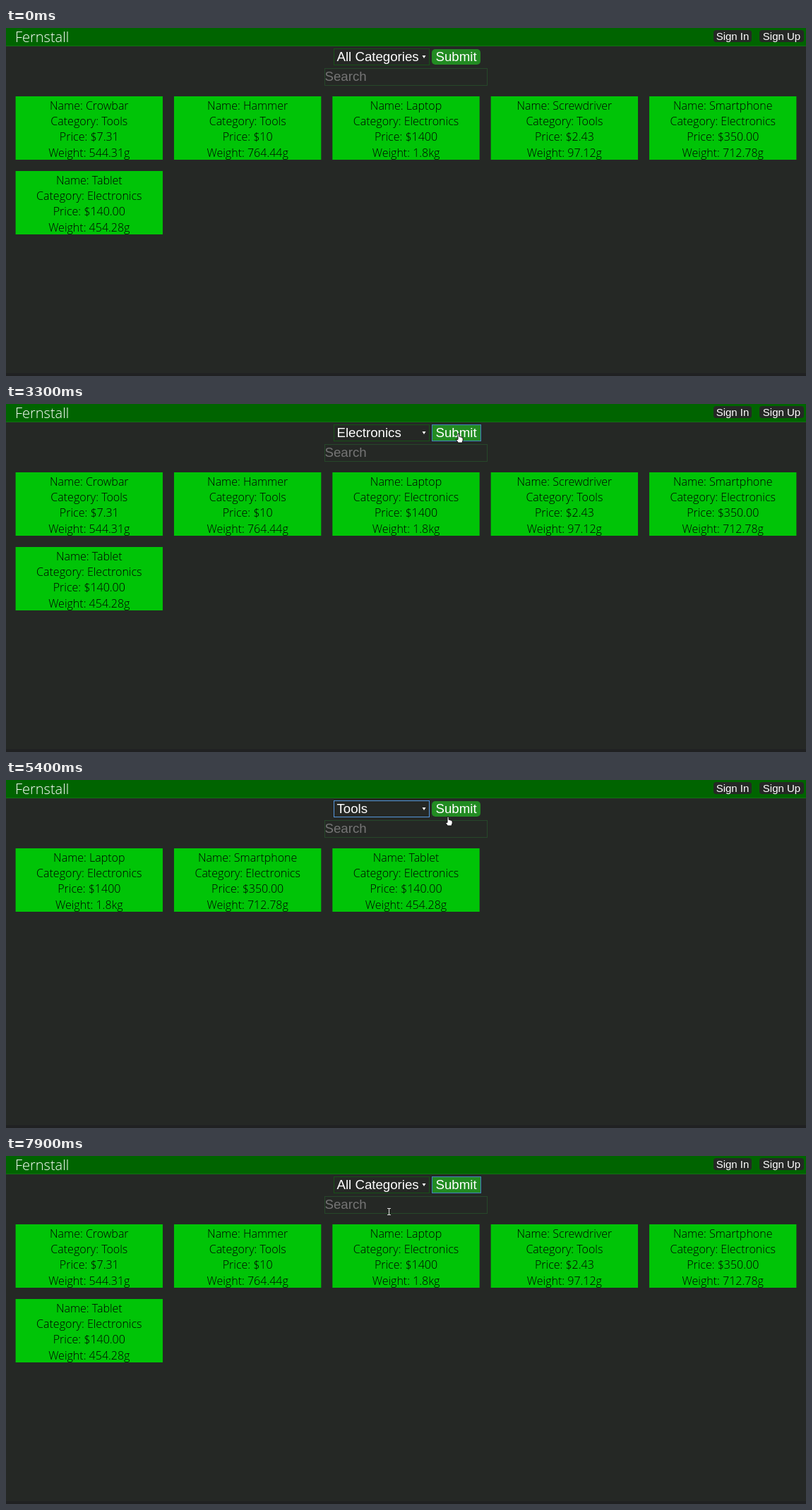
An HTML page with a canvas that plays this animation: 1133x494 px, repeating every 8 s.

```html
<!DOCTYPE html>
<html lang="en">
<head>
<meta charset="utf-8">
<title>Store</title>
<style>
html, body { margin: 0; width: 100%; height: 100%; overflow: hidden; background: #252825; }
canvas { display: block; }
</style>
</head>
<body>
<canvas id="stage" width="1133" height="494"></canvas>
<script>
const ctx = document.getElementById('stage').getContext('2d');
const LOOP = 8000, STEP = 100;
const BG = '#252825', GREEN = '#00c407', BLUE = '#5596dc';
const LIGHT = '"Open Sans", "Noto Sans", sans-serif';
const ARIAL = '"Liberation Sans", Arial, sans-serif';
const OPTIONS = ['All Categories', 'Electronics', 'Tools'];
const MENU_TOP = 53, ROW = 23.5;

const PRODUCTS = [
  ['Crowbar', 'Tools', '$7.31', '544.31g'],
  ['Hammer', 'Tools', '$10', '764.44g'],
  ['Laptop', 'Electronics', '$1400', '1.8kg'],
  ['Screwdriver', 'Tools', '$2.43', '97.12g'],
  ['Smartphone', 'Electronics', '$350.00', '712.78g'],
  ['Tablet', 'Electronics', '$140.00', '454.28g']
];

// Each round opens the menu, picks an option, then submits it.
const ROUNDS = [
  { option: 1, open: 1600, pick: 2600, submit: 3300, y: 42 },
  { option: 2, open: 4400, pick: 5100, submit: 5700, y: 52 },
  { option: 0, open: 6300, pick: 6900, submit: 7400, y: 43 }
];
const LOAD = 200;

const onSubmit = t => ({ t, x: 641, y: 42 });
const onOption = (t, i) => ({ t, x: 545, y: 60 + 22.5 * i });

const PATH = [
  { t: 300, x: 145, y: 84 },
  { t: 500, x: 459, y: 44 },
  { t: 1000, x: 648, y: 50 },
  ...ROUNDS.flatMap(({ option, open, pick, submit, y }) => [
    { t: open, x: 549, y },
    onOption(pick - STEP, option),
    onOption(pick, option),
    onSubmit(submit - STEP),
    onSubmit(submit + LOAD)
  ]),
  { t: 7900, x: 542, y: 79 }
];

const easeOut = k => 1 - (1 - k) ** 2;

function pointerAt(t) {
  if (t < PATH[0].t) return null;
  const next = PATH.findIndex(p => p.t > t);
  if (next < 0) return PATH[PATH.length - 1];
  const a = PATH[next - 1], b = PATH[next];
  const k = easeOut((t - a.t) / (b.t - a.t));
  return { x: Math.round(a.x + (b.x - a.x) * k), y: Math.round(a.y + (b.y - a.y) * k) };
}

function stateAt(t) {
  const state = { value: 0, shown: 0, focus: '', open: false };
  for (const { option, open, pick, submit } of ROUNDS) {
    if (t < open) break;
    state.focus = t < submit ? 'select' : 'submit';
    state.open = t < pick;
    if (t >= pick) state.value = option;
    if (t >= submit + LOAD) state.shown = option;
  }
  return state;
}

// The highlight trails the pointer by one step.
function hoverAt(t, value) {
  const row = Math.floor((pointerAt(t - STEP).y - MENU_TOP) / ROW);
  return row in OPTIONS ? row : value;
}

function box(x, y, w, h, color, radius = 0) {
  ctx.fillStyle = color;
  ctx.beginPath();
  ctx.roundRect(x, y, w, h, radius);
  ctx.fill();
}

function frame(x, y, w, h, color) {
  ctx.strokeStyle = color;
  ctx.lineWidth = 1;
  ctx.strokeRect(x + .5, y + .5, w - 1, h - 1);
}

function text(str, x, y, font, color, align = 'left') {
  ctx.font = font;
  ctx.fillStyle = color;
  ctx.textAlign = align;
  ctx.fillText(str, x, y);
}

const field = (str, x, y, color = '#fff') => text(str, x, y, '18.67px ' + ARIAL, color);

function drawHeader() {
  box(0, 0, 1133, 26, '#006400');
  box(0, 25, 1133, 1, '#147014');
  text('Fernstall', 13, 20, '300 20px ' + LIGHT, '#fff');
  for (const [label, x, w] of [['Sign In', 1002, 54], ['Sign Up', 1067, 63]]) {
    box(x, 3, w, 17, BG, 4);
    text(label, x + w / 2, 17, '15px ' + ARIAL, '#fff', 'center');
  }
}

function drawCards(option) {
  const list = PRODUCTS.filter(p => !option || p[1] === OPTIONS[option]);
  list.forEach(([name, category, price, weight], i) => {
    const x = 13.6 + 224.36 * (i % 5), y = 97 + 106 * Math.floor(i / 5);
    box(x, y, 208.36, 90, GREEN);
    const lines = ['Name: ' + name, 'Category: ' + category, 'Price: ' + price, 'Weight: ' + weight];
    lines.forEach((line, n) =>
      text(line, x + 104.2, y + 18.5 + 22.4 * n, '300 16px ' + LIGHT, '#000', 'center'));
  });
}

function drawForm({ value, focus }) {
  frame(464, 29, 136, 24, focus === 'select' ? BLUE : '#175217');
  field(OPTIONS[value], 468.5, 47);
  polygon(592, 41, [[-2.5, -2], [2.5, -2], [0, 2]]);

  if (focus === 'submit') {
    box(603, 29, 70, 24, '#228b22');
    frame(603, 29, 70, 24, '#3f82bd');
  } else {
    box(603, 30, 69, 22, '#228b22', 5);
  }
  field('Submit', 608.5, 47);

  frame(451, 57, 231, 25, '#26472a');
  field('Search', 451.5, 75, '#757575');
}

function drawMenu(hover) {
  box(465, MENU_TOP, 134, 71, BG);
  frame(465, MENU_TOP - 1, 134, 72, BLUE);
  box(465, MENU_TOP + ROW * hover, 134, ROW, '#1e90ff');
  OPTIONS.forEach((name, i) => field(name, 469, 70 + ROW * i));
}

function polygon(x, y, points, outline) {
  ctx.beginPath();
  points.forEach(([dx, dy]) => ctx.lineTo(x + dx, y + dy));
  ctx.closePath();
  ctx.fillStyle = '#fff';
  ctx.fill();
  if (!outline) return;
  ctx.lineWidth = 1;
  ctx.strokeStyle = outline;
  ctx.stroke();
}

const ARROW = [[0, 0], [0, 9.5], [2.2, 7.6], [3.8, 11], [5.4, 10.2], [3.9, 7], [6.8, 6.8]];
const HAND = [[-1, 0], [1, 0], [1.2, 4.3], [5.8, 5.6], [6.3, 9], [5, 13], [-.5, 13], [-4, 8.2], [-1, 8.4]];

function drawBeam(x, y) {
  box(x, y - 4, 1, 9, '#ddd');
  box(x - 2, y - 5, 5, 1, '#ddd');
  box(x - 2, y + 4, 5, 1, '#ddd');
}

function drawPointer({ x, y }, open) {
  const within = (l, t, r, b) => !open && x >= l && x < r && y >= t && y < b;
  if (within(603, 29, 673, 53)) polygon(x, y, HAND, '#111');
  else if (within(451, 57, 682, 82)) drawBeam(x, y);
  else polygon(x, y, ARROW, '#111');
}

function draw(t) {
  const state = stateAt(t), pointer = pointerAt(t);
  box(0, 0, 1133, 494, BG);
  box(0, 490, 1133, 4, '#202122');
  drawHeader();
  drawCards(state.shown);
  drawForm(state);
  if (state.open) drawMenu(hoverAt(t, state.value));
  if (pointer) drawPointer(pointer, state.open);
}

const origin = performance.now();
function tick() {
  const t = (performance.now() - origin) % LOOP;
  draw(Math.floor(t / STEP) * STEP);
  requestAnimationFrame(tick);
}
tick();
</script>
</body>
</html>
```
